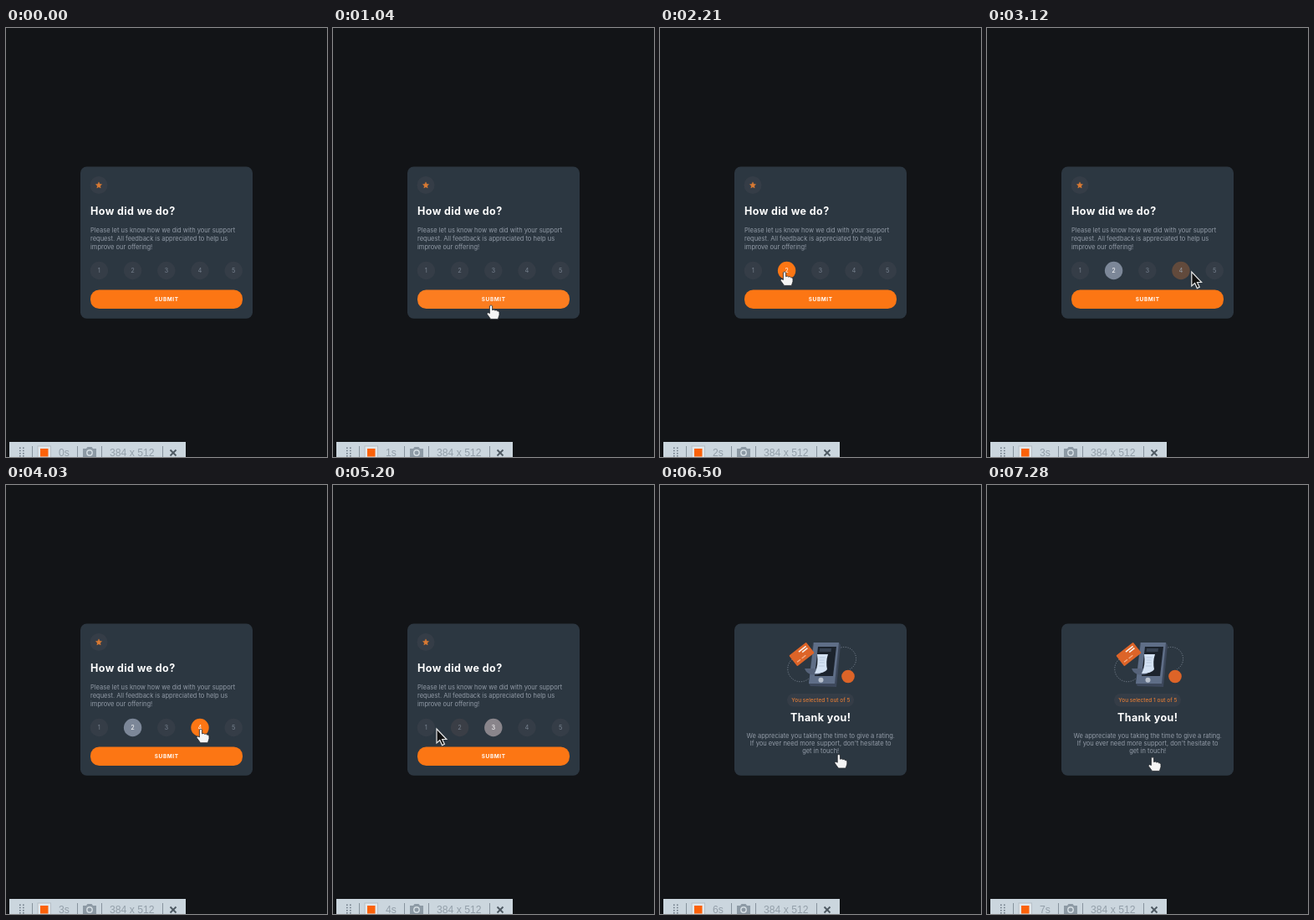
Animation of 384x512 px, one loop 8000 ms. Source, as an HTML page:

```html
<!DOCTYPE html>
<html lang="en">
<head>
<meta charset="utf-8">
<title>Rating card</title>
<style>
html, body { margin: 0; height: 100%; overflow: hidden; background: #121417; }
svg { display: block; width: 100vw; height: 100vh; font: 7.5px Inter, sans-serif; }
.title { font-size: 12.5px; font-weight: 700; letter-spacing: .4px; fill: #fff; }
.copy { fill: #929ba7; }
.mid { text-anchor: middle; }
.bar { font: 12.2px "Liberation Sans", Arial, sans-serif; fill: #939fa9; }
</style>
</head>
<body>
<svg viewBox="0 0 384 512">
  <rect width="384" height="512" fill="#121417"/>
  <rect x="89" y="165.5" width="206" height="181.2" rx="7.5" fill="#2c3741"/>

  <g id="form">
    <circle cx="111" cy="187.5" r="10.5" fill="#353d47"/>
    <path d="M111 183.8l1.1 2.4 2.5.4-1.8 1.8.4 2.5-2.2-1.2-2.2 1.2.4-2.5-1.8-1.8 2.5-.4z" fill="#d87a34" stroke="#d87a34" stroke-width=".4" stroke-linejoin="round"/>
    <text class="title" x="101" y="223">How did we do?</text>
    <g class="copy">
      <text x="101" y="244">Please let us know how we did with your support</text>
      <text x="101" y="254">request. All feedback is appreciated to help us</text>
      <text x="101" y="264">improve our offering!</text>
    </g>
    <g id="ratings" class="mid"></g>
    <rect id="button" x="101" y="312.5" width="182" height="22.5" rx="10.5"/>
    <text id="submit" class="mid" x="192.2" y="326" font-size="6.4" font-weight="700" letter-spacing=".6">SUBMIT</text>
  </g>

  <g id="thanks" class="mid">
    <g fill="none" stroke="#8b95a3" stroke-width=".9" stroke-dasharray="1 1.7">
      <path d="M158 208A15 15 0 1 0 178 231"/>
      <path d="M214 195A14 14 0 0 1 227 220"/>
    </g>
    <path d="M183 188l31 0 2 3-5 50-31-1-2-3z" fill="#3d485b"/>
    <path d="M184 188h30l-5 49h-31z" fill="#5f6e87"/>
    <path d="M189 193h22l-4 35h-22z" fill="#1c232d"/>
    <path d="M191 195h14l-.5 4h-14z" fill="#374252"/>
    <circle cx="192.5" cy="232.7" r="3" fill="#b9c2cf"/>
    <path d="M173 219h19v6q-4 2-9 1.5-8-1-10-7.500z" fill="#56637a"/>
    <path d="M188 202h13q-3 9-1 18-3 5-15 5 5-10 3-23z" fill="#d4e2f4"/>
    <path d="M190.500 206h7m-7 3h6m-6 3h6m-7 4h7" stroke="#a9bad0" stroke-width=".7"/>
    <g transform="translate(169.5 202) rotate(-38)">
      <rect x="-13" y="-8" width="26" height="16" rx="1" fill="#dd6428"/>
      <path d="M-1-4.500H10M2-1.500H10" stroke="#f4eee9" stroke-width="1.6"/>
      <path d="M-10 4h5m2 0h6" stroke="#f3b18c" stroke-width="1.2"/>
    </g>
    <circle cx="225" cy="228.5" r="7.8" fill="#dd6428"/>
    <rect x="152" y="249" width="80" height="15.5" rx="7.75" fill="#353d47"/>
    <text x="192.3" y="259" fill="#dc7a36" font-size="6.5" font-weight="500">You selected 1 out of 5</text>
    <text class="title" x="192.2" y="282">Thank you!</text>
    <g class="copy">
      <text x="192.2" y="302">We appreciate you taking the time to give a rating.</text>
      <text x="192.2" y="311">If you ever need more support, don't hesitate to</text>
      <text x="192.2" y="320">get in touch!</text>
    </g>
  </g>

  <rect x="4" y="494" width="211" height="18" fill="#cbd6de"/>
  <path d="M16.800 500.500v11M20.800 500.500v11" stroke="#6f7b86" stroke-width="1.6" stroke-dasharray="1.6 1.6"/>
  <path d="M31.500 499v13M85.500 499v13M114.500 499v13M187.500 499v13" stroke="#87939d"/>
  <rect x="38" y="499" width="15.500" height="14" fill="#e3e7ea" stroke="#b5c0c8"/>
  <rect x="41" y="502" width="9.500" height="9.500" fill="#fb6109"/>
  <text id="clock" class="bar" x="63" y="511"></text>
  <path d="M92 502h4l1.500-2h5l1.500 2h4v10H92z" fill="#8d9aa5"/>
  <circle cx="100" cy="507" r="3.2" fill="#8d9aa5" stroke="#d5dee4" stroke-width="1.4"/>
  <text class="bar" x="124" y="511">384 x 512</text>
  <path d="M196.500 503.500l7 7m0-7l-7 7" stroke="#4e5962" stroke-width="1.9"/>

  <g id="cursor">
    <path id="hand" transform="translate(1 1)" d="M-1.6.8Q0-1.2 1.6.8V5.6Q3.6 4.4 4.6 6 6.6 5 7.5 6.8 10 6.2 10 8.6V11.5L8.4 16.4H-.4L-4.9 10.2Q-4.6 7.4-1.6 9.6Z" fill="#f5f5f5" stroke="#22262b" stroke-width=".8"/>
    <path id="arrow" transform="translate(.5 1)" d="M1 0V17L4.8 13.6 7.6 19.6 10.4 18.3 7.7 12.5H12.8Z" fill="#111" stroke="#e6e6e6" stroke-width="1.2"/>
  </g>
</svg>
<script>
const $ = id => document.getElementById(id);
const LOOP = 8000, STEP = 130, TICK = 10, FADE = 400, ENTER = 520, SENT = 6500;
const BASE = [53, 61, 71], GREY = [124, 135, 152], ORANGE = [252, 118, 20];
const LABEL = [118, 128, 142], WHITE = [255, 255, 255];

// Pointer stops: time, x, y
const route = [
  [500, 110, 500], [1040, 188, 330], [1300, 186, 325], [1600, 186, 325],
  [1800, 148, 290], [2560, 148, 290], [2860, 190, 292], [3060, 231, 290],
  [3260, 272, 290], [3440, 272, 290], [3580, 234, 293], [4250, 231, 289],
  [4450, 190, 291], [4790, 190, 291], [5200, 122.5, 290], [5380, 110, 291],
  [5740, 110, 291], [5940, 215, 308], [5980, 225, 318], [6300, 225, 318],
  [6760, 197, 324]
];
// Clicks: time, rating index
const clicks = [[2400, 1], [4100, 3], [4620, 2], [5500, 0]];
const seconds = [1040, 2080, 3120, 4160, 5330, 6240, 7280];

const clamp = v => Math.max(0, Math.min(1, v));
const mix = (a, b, k) => a.map((v, i) => v + (b[i] - v) * k);
const rgb = c => `rgb(${c.map(Math.round)})`;
const ratingX = i => 111.4 + i * 40.2, ratingY = 289.5, radius = 10.7;

$('ratings').innerHTML = [0, 1, 2, 3, 4].map(i =>
  `<circle cx="${ratingX(i)}" cy="${ratingY}" r="${radius}"/>
   <text x="${ratingX(i)}" y="292.2">${i + 1}</text>`).join('');
const discs = $('ratings').querySelectorAll('circle');
const digits = $('ratings').querySelectorAll('text');

function pointer(t) {
  const next = route.findIndex(stop => stop[0] > t);
  if (next < 0) return route[route.length - 1].slice(1);
  if (next === 0) return route[0].slice(1);
  const [t0, ...from] = route[next - 1], [t1, ...to] = route[next];
  return mix(from, to, (t - t0) / (t1 - t0));
}

const overRating = ([x, y], i) => Math.hypot(x - ratingX(i), y - ratingY) < radius;
const overButton = ([x, y]) => x > 101 && x < 283 && y > 312.5 && y < 335;
const fade = (level, on) => clamp(level + (on ? TICK : -TICK) / FADE);

// Run the transitions once and keep one state per displayed step
const states = [];
let hover = [0, 0, 0, 0, 0], pick = [0, 0, 0, 0, 0], press = 0;
for (let t = 0; t < LOOP; t += TICK) {
  const at = pointer(t);
  const picked = clicks.reduce((last, [time, i]) => time <= t ? i : last, -1);
  hover = hover.map((v, i) => fade(v, overRating(at, i)));
  pick = pick.map((v, i) => fade(v, i === picked));
  press = fade(press, overButton(at));
  if (t % STEP === 0) states.push({ at, hover, pick, press });
}

const show = (id, on) => $(id).setAttribute('display', on ? 'inline' : 'none');
const paint = (el, color) => el.setAttribute('fill', rgb(color));

function draw(now) {
  const step = Math.floor(now % LOOP / STEP), t = step * STEP;
  const { at, hover, pick, press } = states[step];
  const sent = t >= SENT;
  show('form', !sent);
  show('thanks', sent);

  discs.forEach((disc, i) => {
    paint(disc, mix(mix(BASE, GREY, pick[i]), ORANGE, hover[i]));
    paint(digits[i], mix(LABEL, WHITE, Math.max(hover[i], pick[i])));
  });
  paint($('button'), mix(ORANGE, WHITE, press));
  paint($('submit'), mix(WHITE, ORANGE, press));

  const hand = sent || overButton(at) || hover.some((_, i) => overRating(at, i));
  show('cursor', t >= ENTER);
  show('hand', hand);
  show('arrow', !hand);
  $('cursor').setAttribute('transform', `translate(${at})`);

  $('clock').textContent = seconds.filter(s => s <= t).length + 's';
}

const start = performance.now();
function tick() {
  draw(performance.now() - start);
  requestAnimationFrame(tick);
}
tick();
</script>
</body>
</html>
```
